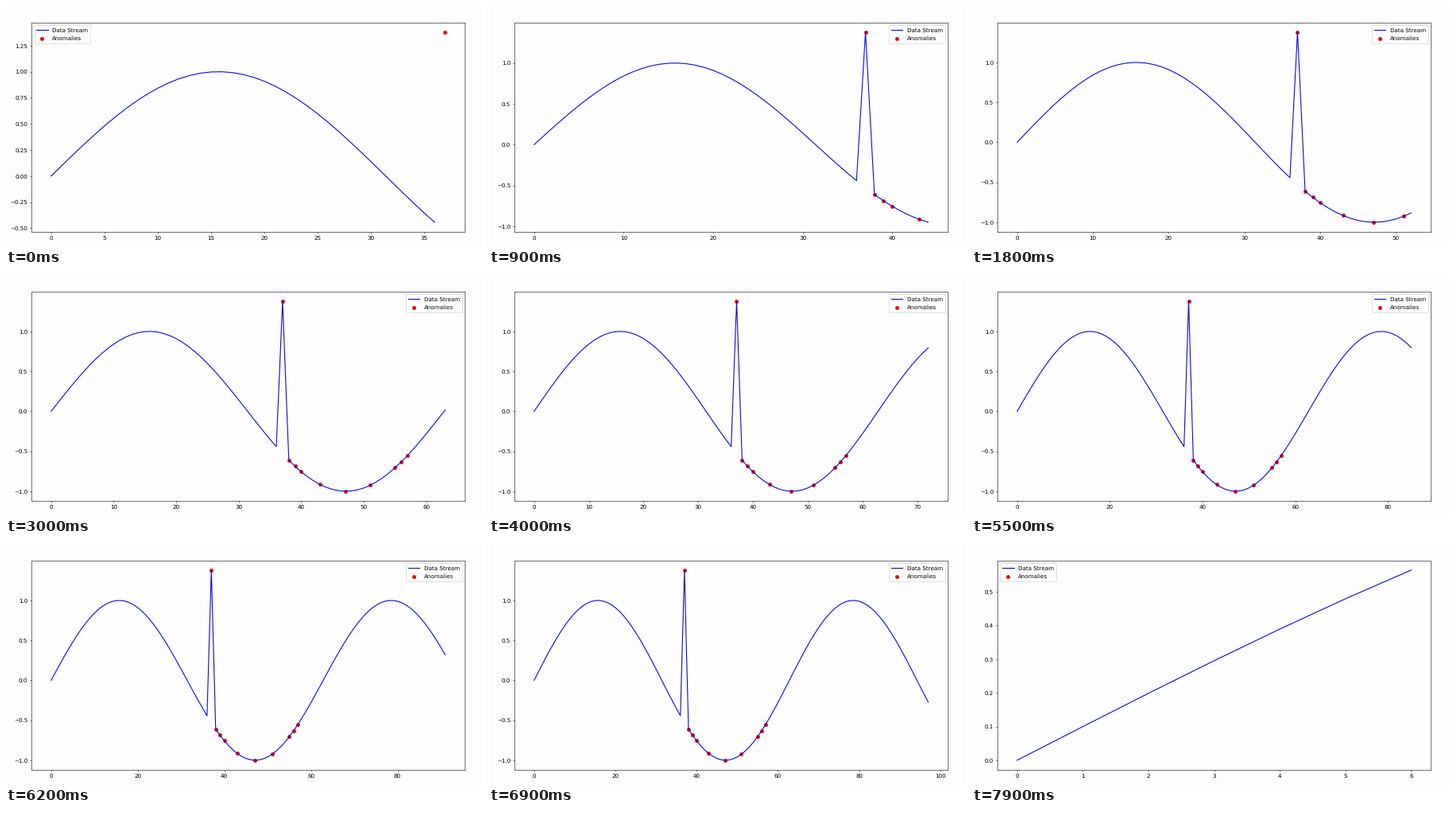
A matplotlib script for the animation above (8 s loop, 600x303 px).

```python
import numpy as np
import matplotlib.pyplot as plt
from matplotlib.animation import FuncAnimation

W, H, DPI = 600, 303, 50
FRAMES, INTERVAL = 80, 100
POINTS = 100
START, RATE = 37.8, 0.885  # first sample shown, samples per frame
PAPER, BLUE, RED = "#fdfdfe", "#0c0ccc", "#e60a0e"

plt.rcParams.update({
    "font.family": "DejaVu Sans",
    "font.size": 10.2,
    "text.hinting": "none",
    "lines.linewidth": 1.6,
    "lines.markersize": 6.1,
    "figure.facecolor": PAPER,
    "axes.facecolor": PAPER,
})

xs = np.arange(POINTS)
stream = np.sin(0.1 * xs)
stream[37] = 1.38
anomalies = np.array([37, 38, 39, 40, 43, 47, 51, 55, 56, 57])

fig = plt.figure(figsize=(W / DPI, H / DPI), dpi=DPI)
ax = fig.add_axes([32 / W, 19.2 / H, 545.2 / W, 263 / H])


def update(frame):
    n = int(START + RATE * frame) % POINTS
    hits = anomalies[anomalies <= n]
    ax.clear()
    # the newest anomaly appears one step ahead of the line
    ax.plot(xs[:n], stream[:n], color=BLUE, label="Data Stream")
    ax.scatter(hits, stream[hits], color=RED, label="Anomalies")
    ax.legend(loc="best")
    return []


anim = FuncAnimation(fig, update, frames=FRAMES, interval=INTERVAL,
                     init_func=lambda: [], repeat=True, repeat_delay=0)
plt.show()
```
